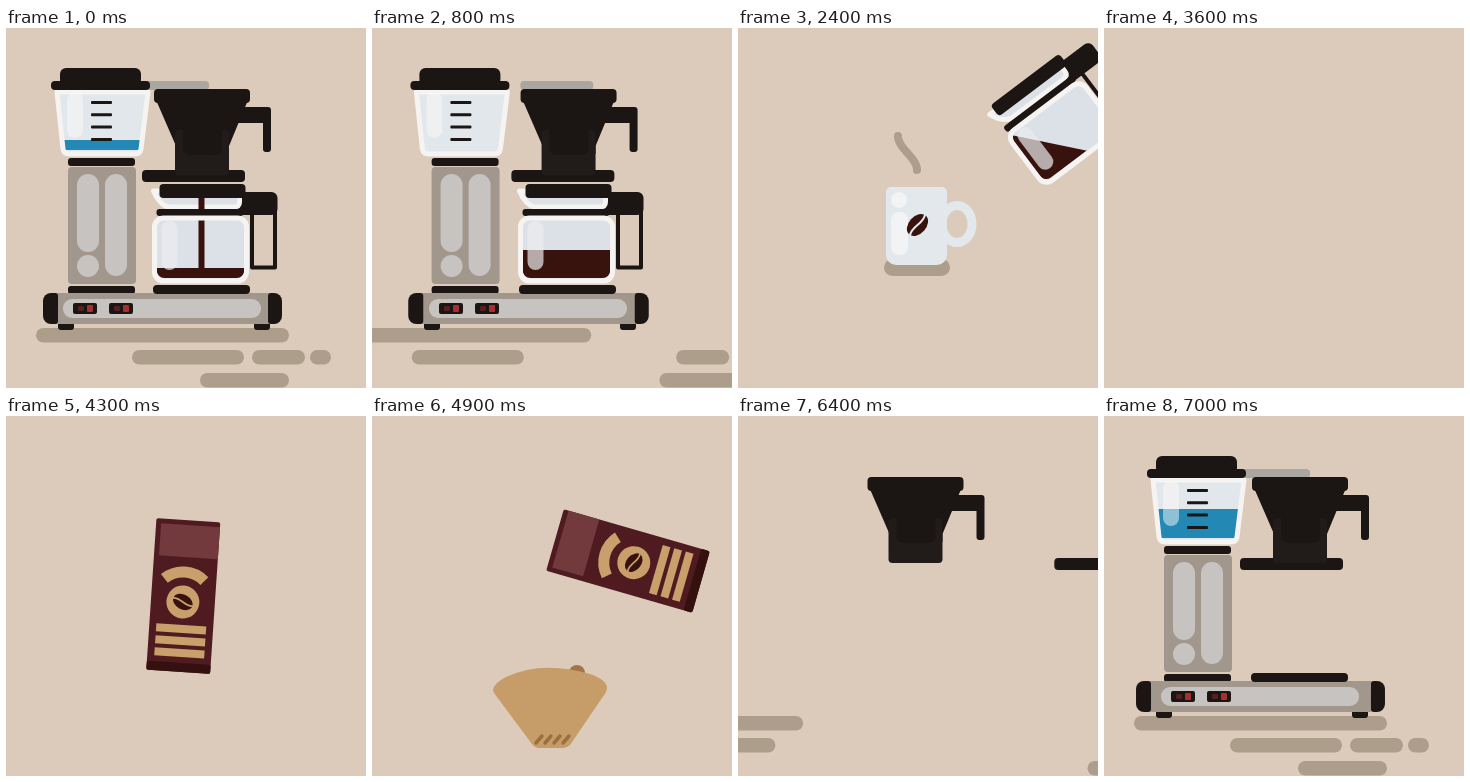
Animation, 360 px wide and 360 px high, one loop 7.1 s. Source, as an HTML page with a canvas:

```html
<!DOCTYPE html>
<html>
<head>
<meta charset="utf-8">
<title>Coffee brewing</title>
<style>
html, body { margin: 0; height: 100%; overflow: hidden; background: #dccbba; }
canvas { display: block; }
</style>
</head>
<body>
<canvas id="stage" width="360" height="360"></canvas>
<script>
const c = document.getElementById('stage').getContext('2d');
const LOOP = 7100, STEP = 100;
const BLACK = '#1b1514', SHADE = '#ad9d8b', GLASS = '#dce1e7', WHITE = '#f5f4f2',
  COFFEE = '#38130d', GREY = '#a1978d', LIGHT = '#c7c3c0', TAN = '#c99f6b';

const clamp = v => Math.max(0, Math.min(1, v));
const span = (t, start, length) => clamp((t - start) / length);
const outCubic = p => 1 - (1 - p) ** 3;
const smooth = p => p * p * (3 - 2 * p);
const outBack = p => 1 + 2.7 * (p - 1) ** 3 + 1.7 * (p - 1) ** 2;
const rad = deg => deg * Math.PI / 180;

// Interpolates rows of [time, ...values]
function keys(t, rows) {
  const i = rows.findIndex(r => r[0] > t);
  if (i < 1) return rows[i ? rows.length - 1 : 0].slice(1);
  const a = rows[i - 1], b = rows[i], p = smooth((t - a[0]) / (b[0] - a[0]));
  return a.slice(1).map((v, k) => v + (b[k + 1] - v) * p);
}

function at(x, y, angle, scale, draw) {
  c.save();
  c.translate(x, y);
  c.rotate(rad(angle));
  c.scale(scale, scale);
  draw();
  c.restore();
}

// Rounded box from its left, top, right and bottom edges
function box(l, t, r, b, radius, fill) {
  c.beginPath();
  c.roundRect(l, t, r - l, b - t, radius);
  if (fill) { c.fillStyle = fill; c.fill(); }
}

function shape(d, fill, stroke, width) {
  const p = new Path2D(d);
  if (fill) { c.fillStyle = fill; c.fill(p); }
  if (stroke) {
    c.strokeStyle = stroke;
    c.lineWidth = width;
    c.lineJoin = c.lineCap = 'round';
    c.stroke(p);
  }
}

function disc(x, y, rx, ry, fill) {
  c.beginPath();
  c.ellipse(x, y, rx, ry, 0, 0, 7);
  c.fillStyle = fill;
  c.fill();
}

function bean(x, y, size, angle, seam) {
  at(x, y, angle, size, () => {
    disc(0, 0, 1, 0.7, COFFEE);
    shape('M-1 .1C-.4 -.3 .4 .3 1 -.1', null, seam, 0.17);
  });
}

function pot(x, y, angle, level, slope, off) {
  at(x, y, angle, 1, () => {
    at(off.handle, 0, 0, 1, () => {
      box(31, -55, 77, -32, 6, BLACK);
      shape('M51.5 -36H74.5V20.5H51.5Z', null, BLACK, 4);
    });
    at(off.glass, 0, 0, 1, () =>
      shape('M-47 -56H39V-45Q39 -40 33 -40H-32Q-41 -42 -47 -56Z', GLASS, WHITE, 5));
    box(-44, -38, 43, -31, 3, BLACK);
    at(off.lid, 0, 0, 1, () => box(-41, -63, 45, -49, 4, BLACK));
    at(off.glass, 0, 0, 1, () => {
      box(-46, -29, 46, 34, 9, GLASS);
      c.save();
      box(-44, -29, 44, 31, 8);
      c.clip();
      at(0, 0, slope - angle, 1, () => box(-90, level, 90, 120, 0, COFFEE));
      c.restore();
      if (off.stream) {
        box(-2, -49, 4, -38, 0, COFFEE);
        box(-2, -28, 4, 24, 0, COFFEE);
      }
      box(-46, -29, 46, 34, 9);
      c.strokeStyle = WHITE;
      c.lineWidth = 5;
      c.stroke();
      box(-39, -26, -23, 23, 8, 'rgba(236,237,238,.7)');
    });
  });
}

function dripper(dx, dy) {
  at(dx, dy, 0, 1, () => {
    shape('M232 79H262Q265 79 265 82V121Q265 124 262 124H260Q257 124 257 121V95H230Z', BLACK);
    shape('M150 72H242L223 118V126H170V118Z', BLACK);
    box(169, 102, 223, 147, 4, '#211b1a');
    shape('M177 70H216V121Q215 127 208 127H185Q178 127 177 121Z', BLACK);
    box(148, 61, 244, 75, 4, BLACK);
  });
}

function tank(water) {
  const body = 'M51 64H142L135 121Q134 126 129 126H63Q58 126 57 121Z';
  shape(body, '#e2e7eb');
  c.save();
  c.clip(new Path2D(body));
  if (water < 122) box(40, water, 150, 122, 0, '#2388b3');
  c.restore();
  shape(body, null, WHITE, 5);
  box(61, 64, 77, 110, 8, 'rgba(250,250,250,.5)');
  for (let i = 0; i < 4; i++) box(85, 73 + i * 12.3, 106, 76 + i * 12.3, 1, BLACK);
  box(54, 40, 135, 58, 6, BLACK);
  box(45, 53, 144, 62, 4, BLACK);
}

function column() {
  box(62, 258, 129, 266, 3, BLACK);
  box(62, 139, 130, 256, 4, GREY);
  box(71, 146, 93, 224, 11, LIGHT);
  disc(82, 238, 11, 11, LIGHT);
  box(99, 146, 121, 248, 11, LIGHT);
  box(62, 130, 129, 138, 3, BLACK);
}

function base() {
  box(52, 288, 68, 302, 3, BLACK);
  box(248, 288, 264, 302, 3, BLACK);
  box(42, 265, 271, 296, 5, GREY);
  box(57, 271, 255, 290, 9, LIGHT);
  for (const x of [67, 103]) {
    box(x, 275, x + 24, 286, 2, BLACK);
    box(x + 5, 278, x + 11, 283, 1, '#55201f');
    box(x + 14, 277, x + 20, 284, 1, '#a92f2f');
  }
}

const pill = (l, t, r) => () => box(l, t, r, t + 14.5, 7.25, SHADE);

// [travel, entry start, entry length, exit start, draw]
const parts = [
  [-290, 6350, 550, 500, pill(30, 300, 283)],
  [-267, 6350, 550, 450, pill(126, 322, 238)],
  [180, 6450, 500, 450, pill(246, 322, 299)],
  [160, 6450, 500, 400, pill(304, 322, 325)],
  [207, 6350, 550, 400, pill(194, 345, 283)],
  [230, 6680, 420, 600, () => box(130, 53, 203, 62, 4, '#aaa6a1')],
  [-170, 6660, 440, 700, column],
  [-170, 6660, 440, 650, t => tank(93 + (t + 100) % LOOP * 0.19)],
  [-290, 6500, 400, 800, base],
  [-300, 6708, 392, 750, () => box(37, 265, 52, 296, [8, 3, 3, 8], BLACK)],
  [300, 6708, 392, 750, () => box(262, 265, 276, 296, [3, 8, 8, 3], BLACK)],
  [240, 6500, 450, 800, () => box(147, 257, 244, 266, 4, BLACK)],
  [240, 6350, 550, 700, () => box(136, 142, 239, 154, 4, BLACK)],
  [230, 0, 1, 750, t => dripper(t < 6400 ? 0 : -18.5 * (1 - outCubic(span(t, 6400, 400))), 0)]
];

function machine(t) {
  const entering = t > 6000;
  for (const [travel, start, length, leave, draw] of parts) {
    const away = entering ? 1 - outCubic(span(t, start, length)) : span(t, leave, 550) ** 2.5;
    at(travel * away, 0, 0, 1, () => draw(entering || t < 100 ? t : 600));
  }
}

function brewPot(t) {
  const come = (d, start) => t > 6000 ? d * (1 - outCubic(span(t, start, LOOP - start))) : 0;
  const off = {
    glass: come(220, 6750), lid: come(-260, 6767), handle: come(150, 6900), stream: t < 600
  };
  const [x, y, angle, slope] = keys(t, [
    [1000, 194.5, 219, 0, 0], [1400, 219, 184, -18, 0], [1650, 236, 206, -8, -5],
    [2200, 315, 96, -42, 9], [2400, 323, 103, -37, 11.6], [3000, 500, 116, -25, 0]
  ]);
  const level = t > 6000 ? 60 : keys(t, [[0, 21], [700, 3], [1400, 3], [2400, 14]])[0];
  pot(x, y, angle, level, slope, off);
}

function cup(t) {
  const size = outBack(span(t, 1700, 500));
  at(180, 240, 0, size, () => at(-180, -240, 0, 1, () => {
    box(146, 231, 212, 248, 8.5, SHADE);
    c.beginPath();
    c.ellipse(219, 196, 15, 18.5, 0, 0, 7);
    c.strokeStyle = '#e3e8ec';
    c.lineWidth = 9;
    c.stroke();
    box(148, 159, 209, 237, [5, 5, 10, 10], '#e3e8ec');
    disc(161, 172, 8, 8, '#f2f3f4');
    box(153, 184, 170, 227, 8, '#f2f3f4');
    bean(179.5, 197, 12.5, -48, '#e3e8ec');
  }));
  const top = 142 - 34 * span(t, 2000, 400) - 15 * span(t, 2400, 600);
  if (t <= 2000) return;
  let d = 'M179 142';
  for (let y = 142; y >= top; y--) d += `L${169.5 + 9.5 * Math.cos((142 - y) * Math.PI / 34)} ${y}`;
  shape(d, null, SHADE, 8);
}

function bag(t) {
  const [x, y, angle] = keys(t, [
    [3900, -40, 180, 0], [4350, 185, 180, 4], [4700, 284, 179, -28],
    [4900, 256, 145, -74], [5250, 250, 147, -112], [5650, 460, 70, -95]
  ]);
  at(x, y, angle, 1, () => {
    box(-32, -76, 32, 76, 2, '#501b20');
    box(-27, -71, 32, -39, 0, '#723a3c');
    box(-32, 67, 32, 76, 2, '#34100f');
    c.beginPath();
    c.arc(0, 6, 30, rad(-132), rad(-48));
    c.strokeStyle = TAN;
    c.lineWidth = 11;
    c.lineCap = 'butt';
    c.stroke();
    disc(0, 6, 16.5, 16.5, TAN);
    bean(0, 6, 10.5, 25, TAN);
    for (const line of [33, 45, 57]) box(-25, line - 4, 25, line + 4, 0, TAN);
  });
}

function filter(t) {
  const [y, scale] = keys(t, [
    [4700, 400, 1], [4900, 290, 1], [5500, 290, 1], [5650, 305, 1], [6050, 100, 0.6]
  ]);
  at(178, y, 0, scale, () => {
    disc(27, -33, 8, 8, '#a37546');
    shape('M-57 -16Q-56 -23 -44 -29Q-8 -46 40 -32Q57 -26 57 -18Q57 -14 52 -8L20 39Q17 42 13 42H-11Q-15 42 -18 38L-53 -9Q-57 -14 -57 -16Z', '#c69c68');
    for (let i = 0; i < 4; i++)
      shape(`M${-14 + i * 9} 37L${-8 + i * 9} 30`, null, '#99703f', 3.5);
  });
}

function draw(t) {
  c.fillStyle = '#dccbba';
  c.fillRect(0, 0, 360, 360);
  if (t >= 6400 || t < 1400) machine(t);
  if (t > 1700 && t < 3600) cup(t);
  if (t >= 6700 || t < 3000) brewPot(t);
  if (t > 4700 && t < 6100) filter(t);
  if (t > 3900 && t < 5700) bag(t);
  if (t > 5500 && t < 6400) dripper(-18.5, -160 * (1 - outBack(span(t, 5600, 500))));
}

function frame() {
  draw(Math.floor(performance.now() % LOOP / STEP) * STEP);
  requestAnimationFrame(frame);
}
frame();
</script>
</body>
</html>
```
